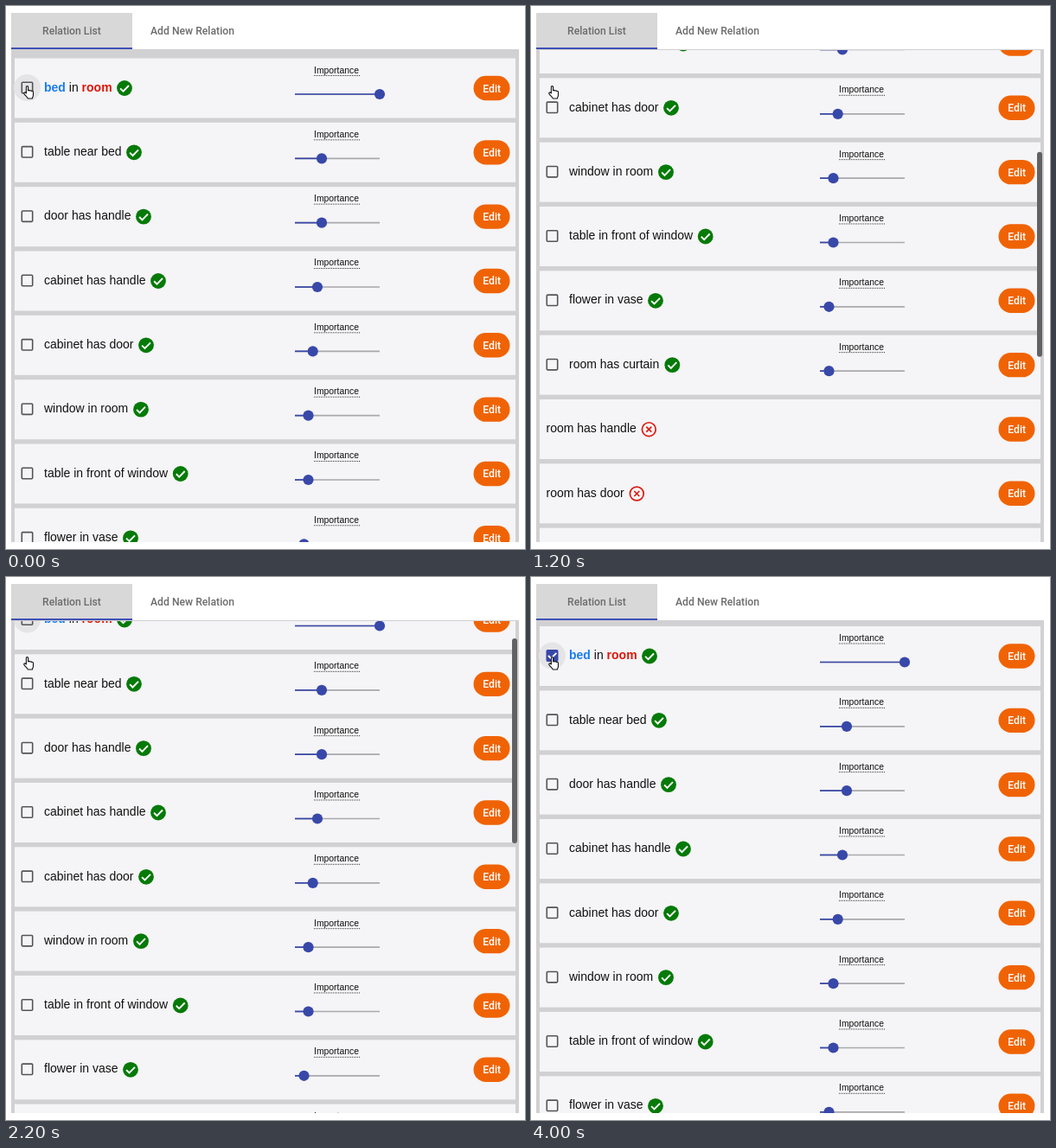
An HTML page for the animation above (4100 ms loop, 600x628 px).

```html
<!DOCTYPE html>
<html lang="en">
<head>
<meta charset="utf-8">
<title>Relation list</title>
<style>
  html, body { margin: 0; width: 100%; height: 100%; overflow: hidden; background: #fff; }
  svg { display: block; }
  text { font: 14px "Liberation Sans", Arial, sans-serif; fill: #111; }
  .tab, .edit { font: 500 12.2px Roboto, sans-serif; text-anchor: middle; }
  .tab { fill: #6c6c6c; }
  .edit { fill: #fff; }
  .importance { font-size: 10.4px; }
  .subject, .object { font-weight: bold; }
  .subject { fill: #1a7cf0; }
  .object { fill: #de1507; }
  .box { fill: none; stroke: #545456; stroke-width: 1.6; }
  .checked .box { fill: #3848a9; stroke: #3848a9; }
  .tick { fill: none; stroke: #fff; stroke-width: 1.9; }
  .box + .tick { visibility: hidden; }
  .checked .box + .tick { visibility: visible; }
</style>
</head>
<body>
<svg width="600" height="628" viewBox="0 0 600 628">
  <clipPath id="view"><rect x="6" y="50" width="587" height="570"/></clipPath>
  <rect x="6" y="8" width="140" height="42" fill="#d9d8d9"/>
  <rect x="6" y="48" width="140" height="2" fill="#3f51b5"/>
  <text class="tab" x="76" y="33">Relation List</text>
  <text class="tab" x="215.5" y="33">Add New Relation</text>
  <g clip-path="url(#view)">
    <rect x="6" y="50" width="587" height="570" fill="#d1d0d2"/>
    <g id="list"></g>
    <rect x="6" y="50" width="587" height="1" fill="#d1d0d2"/>
    <rect id="thumb" x="585" width="6" height="237" rx="3" fill="#626264"/>
  </g>
  <path transform="translate(20 92)" fill="#fff" stroke="#111" stroke-width="1.1" stroke-linejoin="round"
    d="M3.4 9V1.7a1.1 1.1 0 0 1 2.2 0V6c.3-1 2-.8 2.2.2.5-.7 1.8-.5 2 .5.6-.5 1.7-.1 1.7 1V11c0 2-1 2.3-1.1 4H5.2C4.8 13.2 2 11.6.8 9.2.5 7.9 2.2 7.2 3.4 9z"/>
</svg>
<script>
const PITCH = 74.33, TOP = 57, STEP = 100, LOOP = 4100, CHECK_AT = 3500;
const THUMB_RATIO = 0.4275;

// [label, status icon x, slider knob x]; rows without a knob are rejected
const rows = [
  ['<tspan class="subject">bed</tspan> in <tspan class="object">room</tspan>', 137, 432],
  ['table near bed', 148, 365],
  ['door has handle', 159, 365],
  ['cabinet has handle', 176, 360],
  ['cabinet has door', 162, 354.7],
  ['window in room', 156, 349.5],
  ['table in front of window', 201.7, 349.5],
  ['flower in vase', 144, 344.5],
  ['room has curtain', 163.3, 344.5],
  ['room has handle', 136.3],
  ['room has door', 122.3],
  ['']
];

// Scroll position per step, starting at SCROLL_FROM
const SCROLL_FROM = 300;
const scroll = [-3.5, 0, 14, 51, 105, 164, 215, 245, 262, 271, 275, 276,
  272, 264, 251.5, 222, 176, 124, 79, 42, 19, 7, 2, 0];

const accepted = (label, iconX, knobX) => `
  <rect class="box" x="18.3" y="27.8" width="12.4" height="12.4" rx="1"/>
  <path class="tick" d="M20 34l3.2 3.2 6.2-6.4"/>
  <text x="44" y="38.2">${label}</text>
  <circle cx="${iconX}" cy="34.5" r="8.9" fill="#057a08"/>
  <path class="tick" d="M${iconX - 4.9} 34.8l3.4 3.4 6.5-6.7"/>
  <text class="importance" x="356" y="17">Importance</text>
  <path d="M356 20h53" stroke="#333" stroke-dasharray="1 1"/>
  <path d="M334 41.5h98" stroke="#a9a8ab" stroke-width="1.7"/>
  <path d="M334 41.5H${knobX}" stroke="#3848a9" stroke-width="1.7"/>
  <circle cx="${knobX}" cy="41.5" r="6.1" fill="#3848a9"/>`;

const rejected = (label, iconX) => `
  <text x="17.5" y="38.4">${label}</text>
  <g transform="translate(${iconX} 34.7)" fill="none" stroke="#dc1c12" stroke-width="1.7">
    <circle r="7.9"/><path d="M-3-3l6 6m0-6l-6 6"/>
  </g>`;

const list = document.getElementById('list');
const thumb = document.getElementById('thumb');

list.innerHTML = rows.map(([label, iconX, knobX], i) => `
  <g transform="translate(0 ${i * PITCH})">
    <rect x="10" width="579" height="69" fill="#f5f4f6"/>
    ${i ? '' : '<circle cx="24.5" cy="34" r="15.5" fill="#e5e4e6"/>'}
    ${knobX ? accepted(label, iconX, knobX) : label && rejected(label, iconX)}
    <rect x="540.5" y="20.3" width="42" height="28.4" rx="14.2" fill="#f06304"/>
    <text class="edit" x="561.7" y="39">Edit</text>
  </g>`).join('');

const clamp = (v, lo, hi) => Math.min(hi, Math.max(lo, v));

function draw(now) {
  const t = Math.floor(now % LOOP / STEP) * STEP;
  const y = scroll[clamp((t - SCROLL_FROM) / STEP, 0, scroll.length - 1)];
  list.setAttribute('transform', `translate(0 ${TOP - y})`);
  list.firstElementChild.classList.toggle('checked', t >= CHECK_AT);
  thumb.setAttribute('y', 53 + Math.max(0, y) * THUMB_RATIO);
  thumb.setAttribute('opacity', t < 400 ? 0 : clamp((3300 - t) / 300, 0, 1));
}

const start = performance.now();
function tick() {
  draw(performance.now() - start);
  requestAnimationFrame(tick);
}
tick();
</script>
</body>
</html>
```
